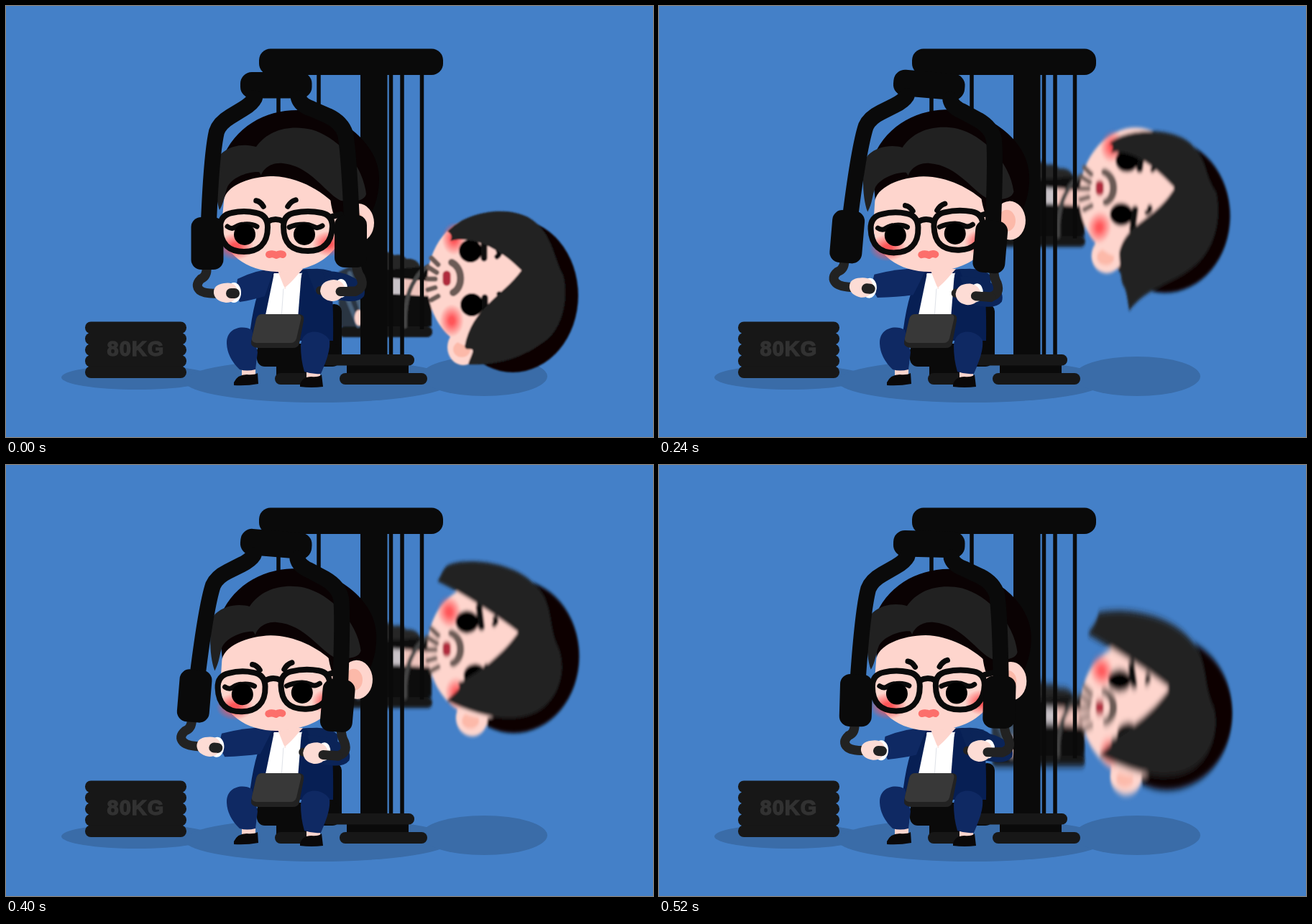
An HTML page without scripts for the animation above (560 ms loop, 900 by 600 pixels).

```html
<!DOCTYPE html>
<html lang="en">
<head>
<meta charset="utf-8">
<title>Chest press</title>
<style>
  html, body { margin: 0; width: 100%; height: 100%; overflow: hidden; background: #4480c8; }
  svg { display: block; width: 100vw; height: 100vh; animation: press 560ms step-end infinite; }

  /* --p: press amount, --t: tilt of the hanging head, --blur: its motion blur */
  @keyframes press {
    0%     { --p: 0;   --t: 0;   --blur: url(#soft1); }
    7.14%  { --p: .02; --t: 3;   --blur: url(#soft1); }
    14.28% { --p: .1;  --t: 6;   --blur: url(#soft2); }
    21.42% { --p: .32; --t: 9;   --blur: url(#soft3); }
    28.57% { --p: .54; --t: 10;  --blur: url(#soft3); }
    35.71% { --p: .72; --t: 9;   --blur: url(#soft3); }
    42.85% { --p: .85; --t: 7.5; --blur: url(#soft2); }
    50%    { --p: .93; --t: 4;   --blur: url(#soft2); }
    57.14% { --p: .98; --t: 0;   --blur: url(#soft1); }
    64.28% { --p: 1;   --t: -5;  --blur: url(#soft1); }
    71.42% { --p: .83; --t: -7;  --blur: url(#soft2); }
    78.57% { --p: .6;  --t: -9;  --blur: url(#soft3); }
    85.71% { --p: .43; --t: -9;  --blur: url(#soft3); }
    92.85% { --p: .28; --t: -8;  --blur: url(#soft3); }
  }

  /* The fringe drags behind the lift: level, hanging low, thrown high, flung highest */
  .drag {
    --level: path("M618 327C622 320 618 316 614 314C640 285 705 275 735 300C760 320 762 350 775 375C782 400 778 450 745 470C715 492 680 500 643 499C645 490 652 480 648 478C644 476 640 480 638 474C648 420 690 405 717 368C690 340 650 318 618 327Z");
    --low: path("M628 330C634 322 630 318 626 318C645 295 720 292 744 322C764 345 758 360 775 385C782 420 775 460 748 485C715 515 680 515 654 550C652 535 650 520 646 515C642 508 641 480 640 470C650 425 690 425 717 379C690 350 660 325 628 330Z");
    --high: path("M604 292C610 285 602 284 612 282C615 262 705 262 735 298C760 320 750 345 765 375C778 400 775 440 745 462C715 485 660 478 614 456C620 450 635 440 632 436C628 432 628 428 634 428C650 420 690 395 715 359C690 340 640 305 604 292Z");
    --flung: path("M596 277C602 268 608 262 612 247C640 240 705 245 738 283C765 310 755 345 772 380C778 405 772 440 748 460C715 487 660 472 612 446C618 438 628 432 630 426C628 422 628 424 634 420C650 410 685 388 710 352C690 335 640 302 596 277Z");
    d: var(--level);
    animation: drag 560ms infinite;
  }
  @keyframes drag {
    0%     { d: var(--level); animation-timing-function: steps(4); }
    28.57% { d: var(--low); animation-timing-function: step-end; }
    42.85% { d: var(--low); animation-timing-function: steps(3); }
    64.28% { d: var(--high); animation-timing-function: steps(2); }
    78.57% { d: var(--flung); animation-timing-function: step-end; }
    100%   { d: var(--level); }
  }

  .hanger { transform: translateY(calc(var(--p) * -148px)); }
  .blurred { filter: var(--blur); }
  .tilt { transform: rotate(calc(var(--t) * 1deg)); transform-origin: 647px 379px; }
  .crown { transform: translate(calc(var(--t) * -.2px), calc(var(--t) * 2px)); }
  .pull { transform: scaleY(calc(1 - var(--p) * .42)); transform-origin: 578px 96px; }
  .levers { transform: rotate(calc(var(--p) * 5.7deg)); transform-origin: 380px 110px; }
  .head { transform: rotate(calc(var(--p) * -2deg)); transform-origin: 375px 370px; }
  .fringe { transform: translateX(calc(var(--p) * -5px)); }
  .brows { transform: translate(calc(var(--p) * -3px), calc(var(--p) * 7px)); }
  .glasses { transform: translateX(calc(var(--p) * -2px)); }
  .sleeve-l { transform: scaleX(calc(1 + var(--p) * .5)) skewY(calc(var(--p) * 8deg)); transform-origin: 375px 375px; }
  .sleeve-r { transform: translate(calc(var(--p) * -25px), calc(var(--p) * 9px)); }

  .line { fill: none; stroke-linecap: round; stroke-linejoin: round; }
  .ink { stroke: #0a0a0a; }
  .skin { fill: #fed5cd; }
  .metal { fill: #0a0a0a; }
  .plate { fill: #171717; }
  .label { font: 900 29px "Liberation Sans", Arial, sans-serif; letter-spacing: 1px; fill: #323232; stroke: #323232; stroke-width: 1.4; }
</style>
</head>
<body>
<svg viewBox="0 0 900 600">
  <defs>
    <filter id="soft1"><feGaussianBlur stdDeviation=".8 .8"/></filter>
    <filter id="soft2"><feGaussianBlur stdDeviation="1.4 2.8"/></filter>
    <filter id="soft3"><feGaussianBlur stdDeviation="1.5 5"/></filter>
    <radialGradient id="blush">
      <stop offset=".2" stop-color="#ff5558"/>
      <stop offset="1" stop-color="#ff5558" stop-opacity="0"/>
    </radialGradient>
    <rect id="disc" x="110" width="141" height="16.5" rx="8"/>
  </defs>

  <rect width="900" height="600" fill="#4480c8"/>
  <g fill="#3a6ca8">
    <ellipse cx="182" cy="517" rx="105" ry="17"/>
    <ellipse cx="435" cy="522" rx="187" ry="30"/>
    <ellipse cx="665" cy="515.5" rx="88" ry="27.5"/>
  </g>

  <!-- Plate stack -->
  <g class="plate">
    <rect x="115" y="444" width="131" height="70"/>
    <use href="#disc" y="439.5"/><use href="#disc" y="455"/><use href="#disc" y="470.5"/>
    <use href="#disc" y="486"/><use href="#disc" y="501.5"/>
  </g>
  <text class="label" x="180.5" y="487" text-anchor="middle">80KG</text>

  <!-- Lifted figure -->
  <g class="hanger"><g class="blurred">
    <rect class="plate" x="463" y="446" width="130" height="15" rx="7"/>
    <path d="M463 370L500 352L500 446H463Z" fill="#2c3442"/>
    <path d="M466 385L490 445M478 372L495 425" class="line" stroke="#49627c" stroke-width="6"/>
    <ellipse class="skin" cx="491" cy="434" rx="6" ry="11"/>
    <path d="M500 365L525 344Q532 340 540 347Q550 344 557 352Q570 350 576 362L592 366V380L530 378Z" fill="#252525"/>
    <path d="M500 370L592 362V446H500Z" fill="#090708"/>
    <path d="M538 379L566 381L560 402L538 401Z" fill="#c9c3c8"/>
    <path d="M553 380L590 383V404L553 402Z" fill="#f0c5bd"/>
    <path d="M555 446Q554 405 568 383Q576 367 590 361" class="line" stroke="#444" stroke-width="6"/>

    <ellipse class="crown" cx="705" cy="403" rx="91" ry="107" fill="#0a0203"/>
    <g class="tilt">
      <ellipse class="skin" cx="636" cy="475" rx="22" ry="25"/>
      <ellipse cx="634" cy="478" rx="12" ry="11" fill="#fcb9a9"/>
      <ellipse class="skin" cx="660" cy="385" rx="74" ry="92"/>
      <ellipse cx="620" cy="438" rx="17" ry="23" fill="url(#blush)"/>
      <ellipse cx="623" cy="324" rx="17" ry="23" fill="url(#blush)"/>
      <circle cx="646" cy="341" r="16"/>
      <circle cx="648" cy="416" r="16"/>
      <path d="M665 322V351M666 406V435" class="line ink" stroke-width="9"/>
      <path d="M685 341Q688 345 683 349M686 401Q688 405 683 409" class="line ink" stroke-width="7"/>
    </g>
    <g class="line" stroke="#6b5a54">
      <path d="M620 357C636 365 636 392 622 399" stroke-width="10"/>
      <path d="M592 351L601 360M588 364L599 371M587 380H597M587 395L597 392M592 409L601 404" stroke-width="7"/>
    </g>
    <path d="M613 374V384" class="line" stroke="#b02a3c" stroke-width="11"/>
    <path class="drag" fill="#212121"/>
  </g></g>

  <!-- Machine frame -->
  <path d="M379 96V160M435 96V160M535.5 90V487M551 90V487" class="ink" stroke-width="5.5"/>
  <path class="pull ink" d="M578.5 90V450" stroke-width="5.5"/>
  <g class="metal">
    <rect x="493" y="90" width="37.5" height="400"/>
    <rect x="352" y="59.5" width="256" height="36.5" rx="16"/>
    <rect x="474" y="496" width="86" height="20"/>
    <rect x="376" y="495" width="56" height="22"/>
    <rect x="446" y="415" width="21" height="80" rx="10"/>
    <rect x="349" y="470" width="116" height="32" rx="11"/>
  </g>
  <g class="plate">
    <rect x="440" y="485" width="128" height="15.5" rx="7.5"/>
    <rect x="464" y="511" width="122" height="16" rx="8"/>
    <rect x="374" y="511" width="64" height="16" rx="8"/>
  </g>

  <!-- Seated figure: body -->
  <path d="M362 371Q374 364 385 368L410 367Q440 363 451 376Q456 410 455 466H338Q344 405 362 371Z" fill="#071f54"/>
  <path d="M373 372H411L406 435H360Z" fill="#fff"/>
  <path d="M386 392L383 435" class="line" stroke="#dfe2e8" stroke-width="1"/>
  <path class="skin" d="M377 366H413L388 394Z"/>
  <path d="M372 372L388 392L377 400ZM412 371L388 392L405 400Z" fill="#fff"/>
  <path class="skin" d="M328 502H347V515H328ZM418 507H437V518H418Z"/>
  <path d="M307 470C306 449 328 443 342 451L350 482L347 506Q335 509 325 506Q308 490 307 470Z" fill="#0f2963"/>
  <path d="M410 473C411 448 440 449 450 465C452 480 443 500 438 512Q426 513 415 509Q410 492 410 473Z" fill="#0f2963"/>
  <path d="M317 524Q322 513 335 513Q345 514 350 511L351 526Q335 529 317 528ZM409 527Q412 516 425 516Q435 517 439 513L441 530Q425 532 409 530Z" fill="#0a0808"/>
  <path d="M356 429H408Q416 430 414 438L408 470Q406 476 399 476H350Q340 475 341 467L348 436Q350 429 356 429Z" fill="#222"/>
  <path d="M356 429H406Q412 430 410 437L404 463Q402 469 396 469H348Q341 468 342 462L348 436Q350 429 356 429Z" fill="#383838"/>
  <path class="sleeve-l" d="M373 366Q348 367 322 380Q318 398 325 412Q344 409 360 404Z" fill="#0f2963"/>
  <path d="M418 367Q448 362 462 376L460 400L430 398Z" fill="#0b2458"/>
  <path class="sleeve-r" d="M440 369Q470 368 490 382Q502 392 498 404Q492 412 476 411L460 409L448 392Z" fill="#0b2458"/>

  <!-- Seated figure: head -->
  <g class="head">
    <path d="M300 215C318 168 360 145 405 145C462 146 519 190 519 240C519 272 508 288 498 310L440 330L304 270Z" fill="#0a0203"/>
    <ellipse class="skin" cx="490" cy="302" rx="22" ry="27"/>
    <ellipse cx="486" cy="302" rx="12" ry="15" fill="#fcb9a9"/>
    <path class="skin" d="M303 272C304 250 340 237 372 237C405 238 438 256 457 276L470 292C472 345 430 370 377 370C335 369 300 345 300 305Z"/>
    <path d="M450 235L470 255V286Q466 296 455 288Q450 270 452 262Z" fill="#0a0203"/>
    <ellipse cx="319" cy="335" rx="26" ry="19" fill="url(#blush)"/>
    <ellipse cx="449" cy="331" rx="23" ry="18" fill="url(#blush)"/>
    <path class="fringe" d="M297 284C289 262 291 215 300 205C315 192 335 192 348 196C365 172 395 165 425 172C460 182 497 220 501 262C498 273 480 273 466 271C445 262 425 223 385 219C366 217 356 230 355 236C354 234 353 232 352 231C335 230 313 240 308 252C304 262 304 272 297 284Z" fill="#212121"/>
    <path class="brows line ink" d="M348 271Q354 272 358 279M392 279Q396 272 403 270" stroke-width="7.5"/>
    <g class="glasses">
      <path class="line ink" d="M308 307C318 314 318 304 331 304Q342 303 349 307M394 308Q402 304 415 304C429 304 429 313 440 306" stroke-width="7"/>
      <circle cx="332" cy="318" r="15"/>
      <circle cx="415" cy="318" r="15"/>
      <g class="line ink" stroke-width="8">
        <path d="M314 288Q331 284 348 288Q364 291 364 308C364 332 350 342 331 342C311 342 298 332 298 308Q298 291 314 288Z"/>
        <path d="M401 288Q420 284 439 288Q454 291 454 307C453 331 440 341 420 341C399 341 386 332 386 307Q386 291 401 288Z"/>
        <path d="M364 300Q375 294 386 300M454 293L466 290"/>
      </g>
    </g>
    <path d="M366 346Q371 344 376 347Q381 344 385 346" class="line" stroke="#fc6f6b" stroke-width="10"/>
  </g>

  <!-- Levers, grips and hands -->
  <g class="levers">
    <rect class="metal" x="326" y="92" width="99.5" height="36.5" rx="16"/>
    <g class="line" stroke="#222" stroke-width="13">
      <path d="M279 364Q280 376 271 380Q262 389 270 396Q276 401 296 400"/>
      <path d="M487 360Q489 372 493 377Q500 392 486 397H466"/>
    </g>
    <path class="line ink" d="M346 128Q342 136 330 143L312 154Q297 163 293 175Q286 205 282 300M407 128Q410 138 425 143L448 153Q467 162 472 178Q477 205 481 300" stroke-width="22"/>
    <rect class="metal" x="257.5" y="294" width="45" height="73" rx="14"/>
    <rect class="metal" x="457" y="291" width="45" height="73" rx="14"/>
    <ellipse cx="317" cy="399" rx="10" ry="14" fill="#fff"/>
    <path d="M289 400Q288 388 303 386Q320 383 322 397Q321 413 306 413Q291 411 289 400Z" fill="#fddcd5"/>
    <path d="M313 400H318" class="line" stroke="#222" stroke-width="14"/>
    <path d="M437 396H444" class="line" stroke="#222" stroke-width="12"/>
    <ellipse cx="466" cy="393" rx="9" ry="13" fill="#fff"/>
    <path d="M437 397Q438 382 456 381Q470 382 472 395Q468 411 453 411Q439 409 437 397Z" fill="#fddcd5"/>
    <path d="M465 397.500H486" class="line" stroke="#222" stroke-width="13"/>
  </g>
</svg>
</body>
</html>
```
